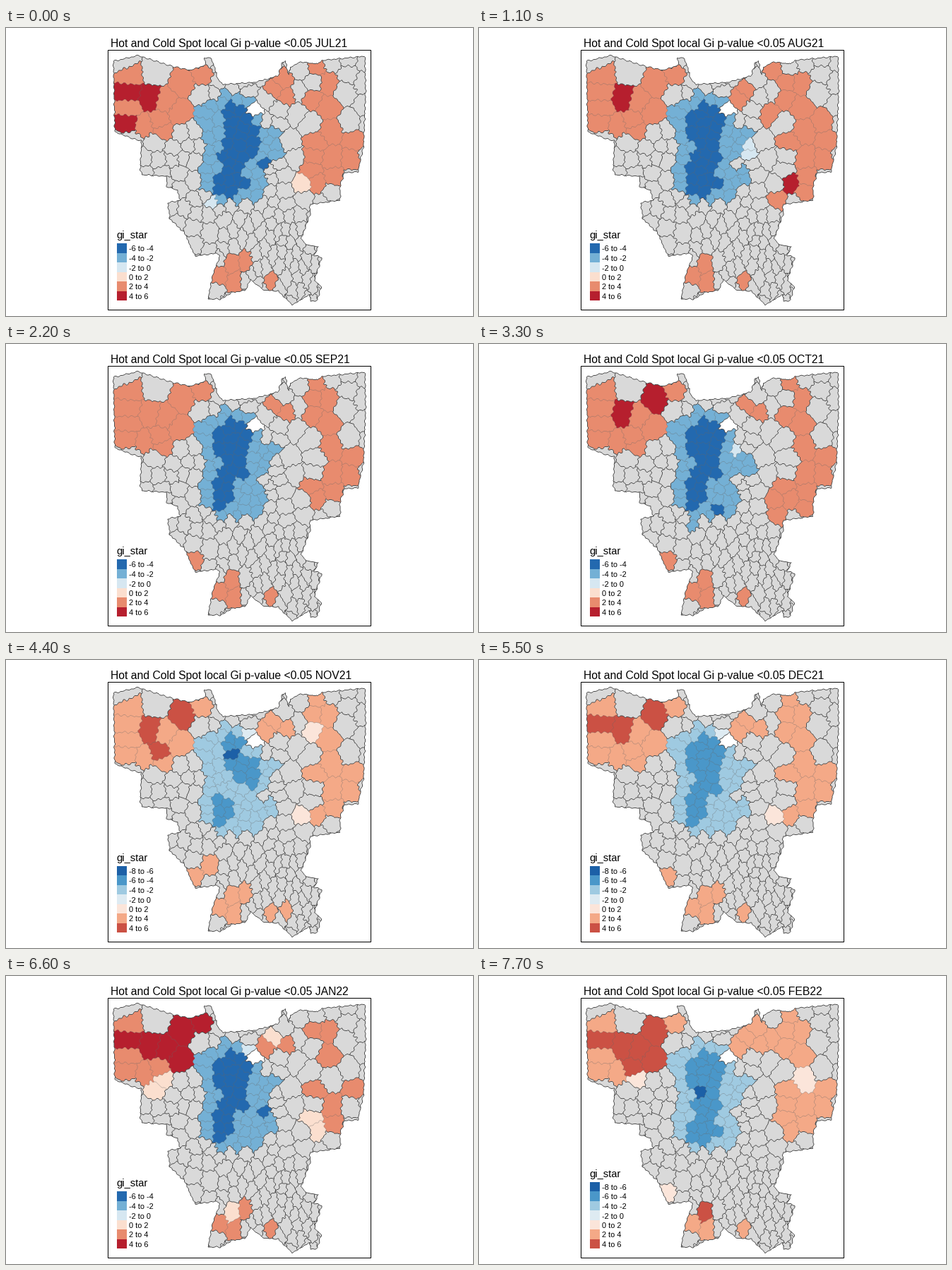
Animation of 661 by 408 pixels, one loop 8000 ms. Source, as a matplotlib script:

```python
import numpy as np
import matplotlib.pyplot as plt
from matplotlib.animation import FuncAnimation
from matplotlib.patches import Rectangle
from matplotlib.path import Path

W, H, DPI = 661, 408, 100
X0, X1, Y0, Y1 = 148, 514, 36, 396
SS = 2  # supersampling of the map
GREY, WHITE = 7, 8
FONT = "Liberation Sans"

# Key points of the coast and borders, clockwise from the north-west
OUTLINE = [
    (152, 47), (187, 39), (234, 54), (262, 60), (283, 52), (281, 43), (290, 42), (298, 64),
    (299, 72), (308, 80), (352, 77), (385, 68), (391, 50), (395, 46), (400, 66), (402, 56),
    (418, 48), (441, 51), (446, 46), (508, 40), (509, 90), (506, 168), (498, 204), (479, 205),
    (473, 222), (473, 244), (430, 250), (431, 262), (418, 298), (425, 307), (442, 310),
    (436, 322), (447, 325), (436, 358), (446, 366), (441, 385), (432, 388), (430, 378),
    (405, 392), (385, 373), (364, 371), (346, 356), (339, 372), (322, 374), (303, 384),
    (286, 384), (293, 348), (303, 323), (299, 319), (268, 323), (252, 290), (232, 270),
    (229, 248), (246, 244), (243, 230), (228, 225), (227, 210), (193, 208), (190, 200),
    (192, 160), (180, 157), (154, 147), (153, 90)]

# Centres of the districts that change colour; all others are scattered
NAMED = dict(
    W1=(166, 47), W2=(174, 66), W3=(172, 92), W4=(206, 99), W5=(224, 103), W6=(212, 62),
    W7=(250, 78), W8=(279, 66), W9=(246, 120), W10=(216, 133), W11=(171, 134),
    W12=(172, 113), W13=(197, 140), W14=(221, 147), W15=(212, 161),
    N1=(368, 101), N2=(380, 87), N3=(398, 96), N4=(392, 75), N5=(415, 90), N6=(411, 121),
    E1=(418, 58), E2=(438, 54), E3=(434, 77), E4=(457, 79), E5=(432, 99), E6=(456, 112),
    E7=(438, 162), E8=(494, 158), E9=(488, 186), E10=(462, 185), E11=(435, 181),
    E12=(431, 201), E13=(421, 221), E14=(440, 220), E15=(465, 211), E16=(460, 232),
    E17=(424, 243), E18=(488, 134), E19=(460, 146),
    S1=(319, 331), S2=(301, 350), S3=(325, 362), S4=(341, 330), S5=(374, 359),
    S6=(397, 355), S7=(265, 307), S8=(290, 290), S9=(297, 374), HOLE=(351, 116))

# Cold areas as rounded blobs: centre x, y and half sizes
BLOBS = dict(
    body=(325, 150, 44, 60), hips=(322, 214, 47, 34), cape=(368, 152, 11, 13),
    lobe=(373, 174, 13, 20), edge=(370, 215, 6, 17), bump=(278, 112, 8, 7),
    tail=(300, 254, 9, 9), spine=(325, 150, 26, 46), chest=(338, 158, 23, 24),
    trunk=(329, 160, 25, 37), neck=(318, 116, 12, 18), foot=(318, 216, 22, 25),
    heel=(304, 208, 17, 21), arm=(356, 195, 10, 6), toe=(329, 232, 8, 5),
    heart=(312, 133, 6, 6), navel=(314, 165, 6, 6), nook=(342, 110, 6, 7),
    sole=(292, 245, 8, 5), pocket=(377, 178, 9, 12), pin=(370, 148, 5, 7))

WEST = "W2 W3 W4 W5 W7 W8 W9 W10 W11 W12 W13 W14 "
FEET = "S1 S2 S3 S5 "
STRIP = "E2 E4 E5 E6 E19 E8 E9 E10 E15 E14 "
COLD = "body hips cape "

# label, first legend class, {class: names} painted in order
# classes: 0 is "-8 to -6" ... 6 is "4 to 6"
MONTHS = [
    ("JUL21", 1, {5: WEST + FEET + STRIP + "N2 N3 N4 E7 E11 E12 S4", 6: "W3 W4 W11", 4: "E13",
                  2: COLD + "lobe", 1: "trunk neck foot arm", 3: "sole"}),
    ("AUG21", 1, {5: WEST + FEET + "N1 N2 N6 E1 E3 E4 E5 E6 E19 E7 E8 E9 E10 E15 E16 E17 E18",
                  6: "W4 E14", 2: COLD + "edge", 1: "spine foot heel", 3: "pocket"}),
    ("SEP21", 1, {5: WEST + FEET + STRIP + "N2 N3 E3 E12 S7", 2: COLD, 1: "spine heel"}),
    ("OCT21", 1, {5: WEST + FEET + STRIP + "N2 N3 E12 E13 E16 E17 S7", 6: "W4 W7",
                  2: "body hips lobe tail", 1: "spine heel toe", 3: "pin"}),
    ("NOV21", 0, {5: WEST + FEET + STRIP + "N1 N2 N3 E3 E7 S4 S6 S7 S8", 6: "W4 W7 W10",
                  4: "E5 E13", 2: COLD + "bump edge", 1: "neck chest heel", 0: "heart", 3: "nook"}),
    ("DEC21", 0, {5: WEST + FEET + STRIP + "N1 N2 N3 E3 E7 S4 S7", 6: "W3 W4 W7", 4: "E13",
                  2: COLD + "bump edge", 1: "spine heel", 3: "nook"}),
    ("JAN22", 1, {5: WEST + FEET + "N1 N3 E3 E4 E6 E7 E8 E10 E15 S4", 6: "W3 W4 W5 W7 W8 W9",
                  4: "N2 E12 E14 S1 W14 W15", 2: COLD + "bump edge", 1: "spine heel arm",
                  3: "nook"}),
    ("FEB22", 0, {5: WEST + FEET + STRIP + "N1 N2 N3 N4 N5 E3 E7 E11 E12",
                  6: "W3 W4 W5 W7 W9 W10 S1", 4: "W14 E19 S7", 2: COLD, 1: "spine foot",
                  0: "navel"}),
]

WIDE = ["#1c60a7", "#4a97c9", "#9fcae1", "#deebf2", "#fbe5da", "#f4a987", "#cb5144"]
SHORT = ["#ffffff", "#2369af", "#74b0d5", "#d6e7f1", "#fbdfcf", "#e88b6e", "#b61f2e"]
LABELS = ["-8 to -6", "-6 to -4", "-4 to -2", "-2 to 0", "0 to 2", "2 to 4", "4 to 6"]


def rgb(colour):
    return [int(colour[i:i + 2], 16) / 255 for i in (1, 3, 5)]


# Pixel grid with a small wobble that roughens every border
gx, gy = np.meshgrid(np.arange(X0, X1, 1 / SS) + .5 / SS, np.arange(Y0, Y1, 1 / SS) + .5 / SS)
wob_x = .7 * np.sin(.8 * gy + .35 * gx) + .6 * np.sin(.45 * gy - .6 * gx)
wob_y = .7 * np.sin(.75 * gx - .3 * gy) + .6 * np.sin(.5 * gx + .55 * gy)


def stretch(x, y):
    """Districts get taller and thinner towards the south."""
    return 1 + .7 / (1 + np.exp((268 - y) / 12)) / (1 + np.exp((305 - x) / 12))


def spacing(x, y):
    if (x < 245 and y < 152) or (x < 270 and y < 118):
        return 99
    if x > 395 and y < 235:
        return 23
    if 280 < x < 385 and 85 < y < 250:
        return 11
    return 15.5


def scatter():
    rng = np.random.default_rng(21)
    seeds = np.array(list(NAMED.values()), float)
    for x, y in rng.uniform((X0, Y0), (X1, Y1), (7000, 2)):
        d = np.hypot((seeds[:, 0] - x) * stretch(x, y), seeds[:, 1] - y)
        gap = spacing(x, y)
        n = len(NAMED) - 1  # the hole, last in the list, is small
        if d[:n].min() > max(gap, 23) and d[n:].min() > gap:
            seeds = np.vstack([seeds, (x, y)])
    return seeds


def nearest(seeds):
    px, py, sx = gx + 1.3 * wob_x, gy + 1.3 * wob_y, stretch(gx, gy)
    best = np.full(gx.shape, np.inf)
    lab = np.zeros(gx.shape, int)
    for i, (x, y) in enumerate(seeds):
        d = ((px - x) * sx) ** 2 + (py - y) ** 2
        near = d < best
        best[near] = d[near]
        lab[near] = i
    return lab


rough = np.column_stack([(gx + .7 * wob_x).ravel(), (gy + .7 * wob_y).ravel()])
land = Path(OUTLINE).contains_points(rough).reshape(gx.shape)
seeds = scatter()
label = nearest(seeds)
label[~land] = len(seeds)
index = {name: i for i, name in enumerate(NAMED)}


def members(name):
    """District numbers of a named district or of a blob."""
    if name in index:
        return [index[name]]
    x, y, rx, ry = BLOBS[name]
    u, v = np.abs(seeds - (x, y)).T
    hit = (u / rx) ** 2.5 + (v / ry) ** 2.5 < 1
    hit[:len(NAMED)] = False
    hit[len(NAMED) + np.hypot(u, v)[len(NAMED):].argmin()] = True
    return np.flatnonzero(hit)


def borders(cls):
    """Mark both sides of each border; dark where it touches bare land."""
    line = np.zeros(cls.shape, bool)
    dark = np.zeros(cls.shape, bool)
    bare = cls >= GREY
    for a, b in ((np.s_[:, :-1], np.s_[:, 1:]), (np.s_[:-1], np.s_[1:])):
        diff = label[a] != label[b]
        deep = diff & (bare[a] | bare[b])
        for side in (a, b):
            line[side] |= diff
            dark[side] |= deep
    return line, dark


def draw_map(first, paint):
    kind = np.full(len(seeds) + 1, GREY)
    for k, names in paint.items():
        for name in names.split():
            kind[members(name)] = k
    kind[[index["HOLE"], -1]] = WHITE
    cls = kind[label]
    palette = (SHORT if first else WIDE) + ["#d9d9d9", "#ffffff"]
    img = np.array([rgb(c) for c in palette])[cls]
    line, dark = borders(cls)
    img[line] = .65 * img[line] + .35 * .4
    img[dark] = .32
    h, w = label.shape
    return img.reshape(h // SS, SS, w // SS, SS, 3).mean((1, 3))


maps = [draw_map(first, paint) for _, first, paint in MONTHS]

fig = plt.figure(figsize=(W / DPI, H / DPI), dpi=DPI, facecolor="white")
ax = fig.add_axes([0, 0, 1, 1])
ax.axis("off")
picture = ax.imshow(maps[0], extent=(X0, X1, Y1, Y0), interpolation="nearest", aspect="auto")
ax.set_xlim(0, W)
ax.set_ylim(H, 0)
ax.add_patch(Rectangle((144.5, 31.5), 372, 368, fill=False, ec="black", lw=.72, snap=False))


def write(x, y, text, px):
    return ax.text(x, y, text, family=FONT, fontsize=px * 72 / DPI, va="baseline")


title = write(147.5, 27, "", 15.72)
heading = write(156, 298, "gi_star", 14.6)
keys = []
for i, name in enumerate(LABELS):
    top = 291.5 + 13.5 * i
    swatch = ax.add_patch(Rectangle((157, top), 14, 13.5, lw=0))
    keys.append((swatch, write(174, top + 11.5, name, 11)))


def update(i):
    m = i // 11
    name, first = MONTHS[m][:2]
    picture.set_data(maps[m])
    title.set_text("Hot and Cold Spot local Gi p-value <0.05 " + name)
    heading.set_y(298 if first else 285)
    for k, (swatch, text) in enumerate(keys):
        swatch.set_facecolor((SHORT if first else WIDE)[k])
        swatch.set_visible(k >= first)
        text.set_visible(k >= first)
    return [picture]


anim = FuncAnimation(fig, update, frames=80, interval=100, init_func=lambda: update(0),
                     repeat=True, repeat_delay=0)
plt.show()
```
